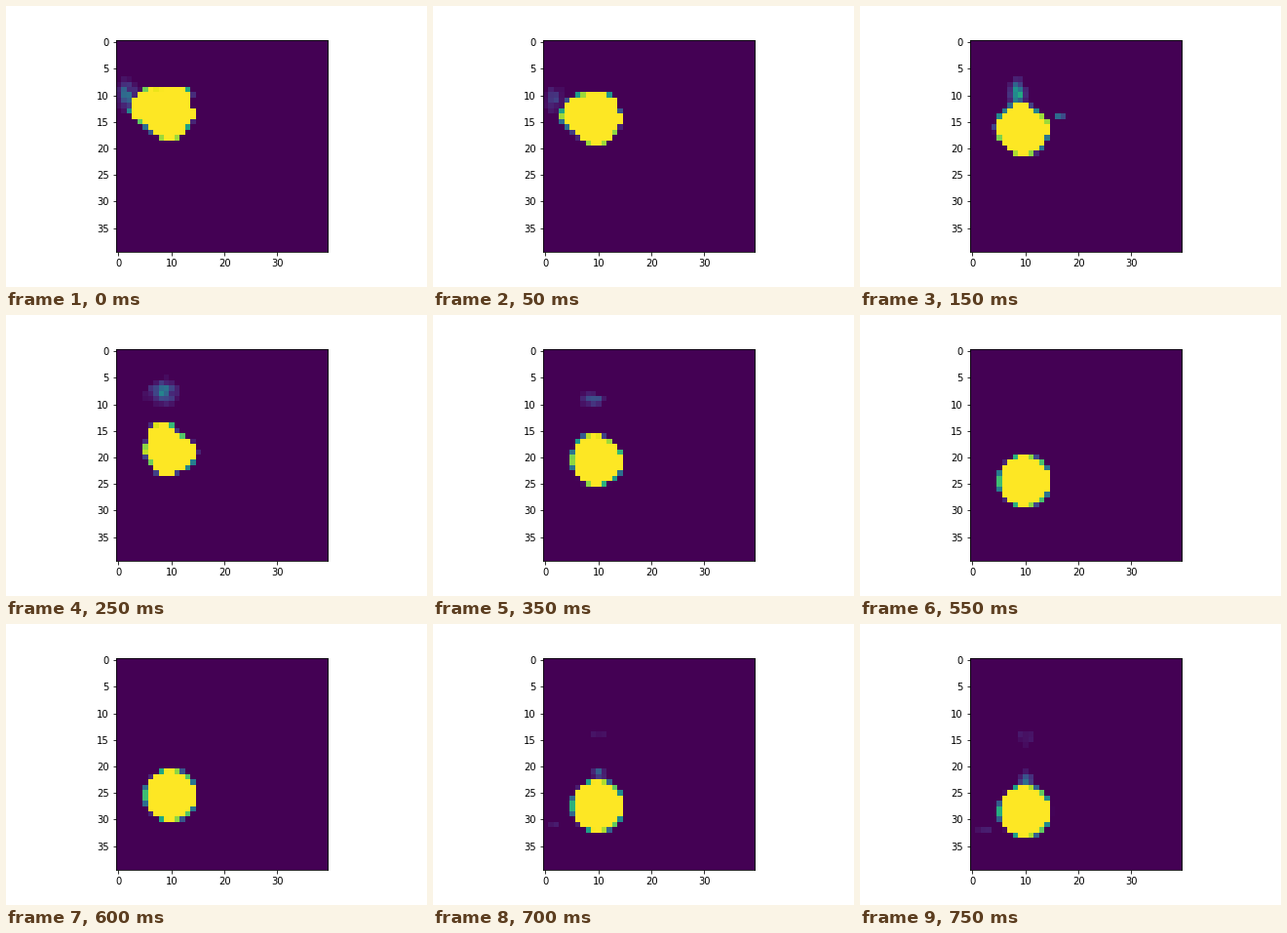
Animation, 432 px wide and 288 px high, one loop 800 ms. Source, as a matplotlib script:

```python
import matplotlib.pyplot as plt
import numpy as np
from matplotlib.animation import FuncAnimation

SIZE = 40
FRAMES = 16
SUB = 8  # samples per cell side
RADIUS = 4.9

# Radius every 22.5 degrees, clockwise from the right, settling into a disc.
SHAPE_TIMES = (0, 3, 5, 8)
RAGGED = (5.3, 4.3, 4.4, 4.9, 5.2, 4.9, 4.8, 5.2,
          7.5, 7.4, 6.6, 5.1, 4.9, 5.5, 5.9, 4.2)
DIAMOND = (5.1, 4.5, 4.9, 4.9, 5.1, 5.0, 4.5, 4.9,
           5.4, 5.3, 4.9, 5.2, 5.4, 4.3, 4.2, 4.9)
DENTED = (5.2, 5.1, 4.9, 4.4, 5.1, 5.3, 4.5, 4.6,
          5.0, 4.5, 5.6, 5.4, 5.0, 3.4, 3.6, 4.2)
SHAPES = np.array([RAGGED, DIAMOND, DENTED, [RADIUS] * 16])
ANGLES = np.arange(16) * np.pi / 8

# Smoke puffs: peak time, fade span, x, y, x radius, y radius, strength
PUFFS = (
    (0, 2, 2.0, 10.5, 1.4, 2.2, 0.4),
    (3, 2, 8.8, 10.3, 1.2, 2.0, 0.75),
    (3, 2, 17.1, 14.5, 0.8, 0.4, 0.6),
    (5, 2, 8.8, 8.3, 2.2, 1.7, 0.45),
    (7, 2, 9.2, 9.6, 2.2, 1.0, 0.3),
    (9, 2, 10.2, 10.8, 1.2, 0.6, 0.15),
    (15, 3, 10.5, 23.0, 1.0, 1.0, 0.5),
    (15, 3, 10.5, 15.2, 1.7, 1.3, 0.1),
    (15, 3, 2.5, 32.5, 1.2, 0.6, 0.16),
)
GRAIN = np.random.default_rng(4).uniform(0.4, 1.2, (SIZE, SIZE))

fine = (np.arange(SIZE * SUB) + 0.5) / SUB
fine_x, fine_y = np.meshgrid(fine, fine)
cell_x, cell_y = np.meshgrid(np.arange(SIZE) + 0.5, np.arange(SIZE) + 0.5)


def body(n):
    """Share of each cell inside the outline, which sinks one row per step."""
    radii = [np.interp(n, SHAPE_TIMES, column) for column in SHAPES.T]
    dx = fine_x - 10 - 0.02 * n
    dy = fine_y - 14 - n
    edge = np.interp(np.arctan2(dy, dx), ANGLES, radii, period=2 * np.pi)
    inside = np.hypot(dx, dy) < edge
    share = inside.reshape(SIZE, SUB, SIZE, SUB).mean(axis=(1, 3))
    return np.clip(1.5 * share - 0.25, 0, 1)


def smoke(n):
    total = np.zeros((SIZE, SIZE))
    for peak, span, x, y, rx, ry, strength in PUFFS:
        fade = max(0, 1 - abs(n - peak) / span)
        dx = (cell_x - x) / rx
        dy = (cell_y - y - (n - peak)) / ry
        total += fade * strength * np.exp(-dx**2 - dy**2)
    total *= GRAIN
    return np.where(total > 0.03, total, 0)


def field(n):
    return np.maximum(body(n), smoke(n))


fig, ax = plt.subplots(figsize=(6, 4), dpi=72, facecolor="white")
fig.subplots_adjust(left=0.125, right=0.9, bottom=0.125, top=0.88)
image = ax.imshow(field(0), cmap="viridis", vmin=0, vmax=1,
                  interpolation="nearest")
ax.set_xticks(range(0, SIZE, 10))
ax.set_yticks(range(0, SIZE, 5))


def update(n):
    image.set_data(field(n))
    return [image]


anim = FuncAnimation(fig, update, frames=FRAMES, interval=50,
                     repeat=True, repeat_delay=0)
plt.show()
```
